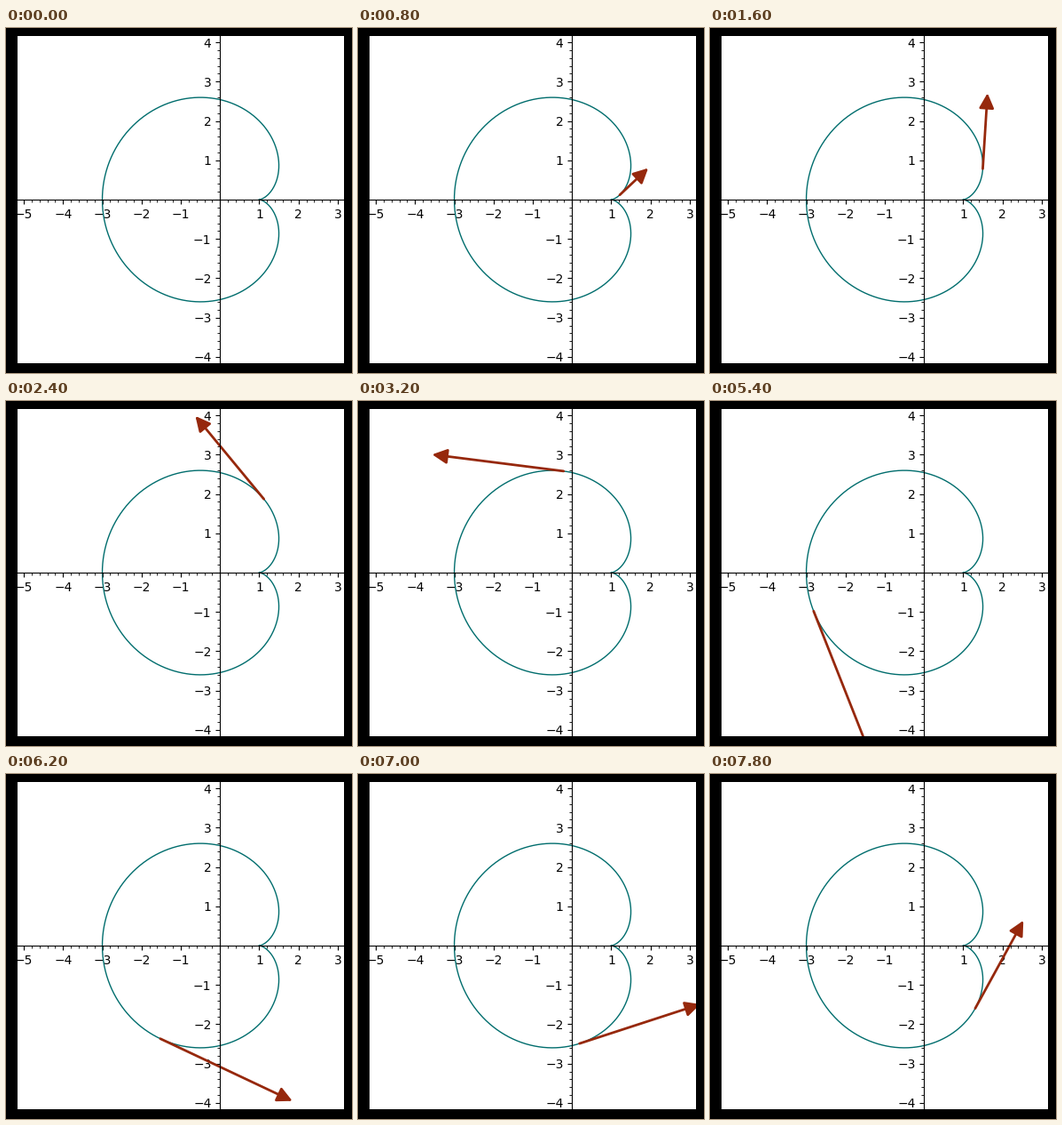
A matplotlib script that plays this animation: 390 by 388 pixels, repeating every 8 s.

```python
import numpy as np
import matplotlib.pyplot as plt
from matplotlib.animation import FuncAnimation
from matplotlib.patches import FancyArrowPatch
from matplotlib.ticker import FuncFormatter, MultipleLocator

W, H, DPI = 390, 388, 100
LEFT, BOTTOM, SIDE = 13, 11, 368
FRAMES, INTERVAL = 40, 200
STEP = 2 * np.pi / 50
TEAL, RUST = "#006d6d", "#96280c"

plt.rcParams["font.family"] = "DejaVu Sans"


def position(t):
    return np.array([2 * np.cos(t) - np.cos(2 * t),
                     2 * np.sin(t) - np.sin(2 * t)])


def velocity(t):
    return np.array([2 * np.sin(2 * t) - 2 * np.sin(t),
                     2 * np.cos(t) - 2 * np.cos(2 * t)])


def tick_label(value, _):
    n = round(value)
    return f"{n}".replace("-", "\u2212") if n else ""


fig = plt.figure(figsize=(W / DPI, H / DPI), dpi=DPI, facecolor="black")
ax = fig.add_axes([LEFT / W, BOTTOM / H, SIDE / W, SIDE / H])
ax.set(xlim=(-5.16, 3.16), ylim=(-4.16, 4.16))

for side in ("left", "bottom"):
    ax.spines[side].set_position(("data", 0))
for side in ("right", "top"):
    ax.spines[side].set_visible(False)
for axis in (ax.xaxis, ax.yaxis):
    axis.set_major_locator(MultipleLocator(1))
    axis.set_minor_locator(MultipleLocator(0.2))
    axis.set_major_formatter(FuncFormatter(tick_label))

ax.plot(*position(np.linspace(0, 2 * np.pi, 600)), color=TEAL, lw=1)

arrow = FancyArrowPatch((1, 0), (1, 1), lw=2, color=RUST, shrinkA=0, shrinkB=0,
                        arrowstyle="-|>,head_width=5,head_length=10",
                        mutation_scale=1, zorder=2.1)
ax.add_patch(arrow)


def update(i):
    t = i * STEP
    tail = position(t)
    arrow.set_positions(tail, tail + velocity(t))
    # The velocity vanishes at the cusp, so there is no arrow there.
    arrow.set_visible(i > 0)
    return [arrow]


anim = FuncAnimation(fig, update, frames=FRAMES, interval=INTERVAL,
                     init_func=lambda: update(0), repeat=True, repeat_delay=0)
plt.show()
```
